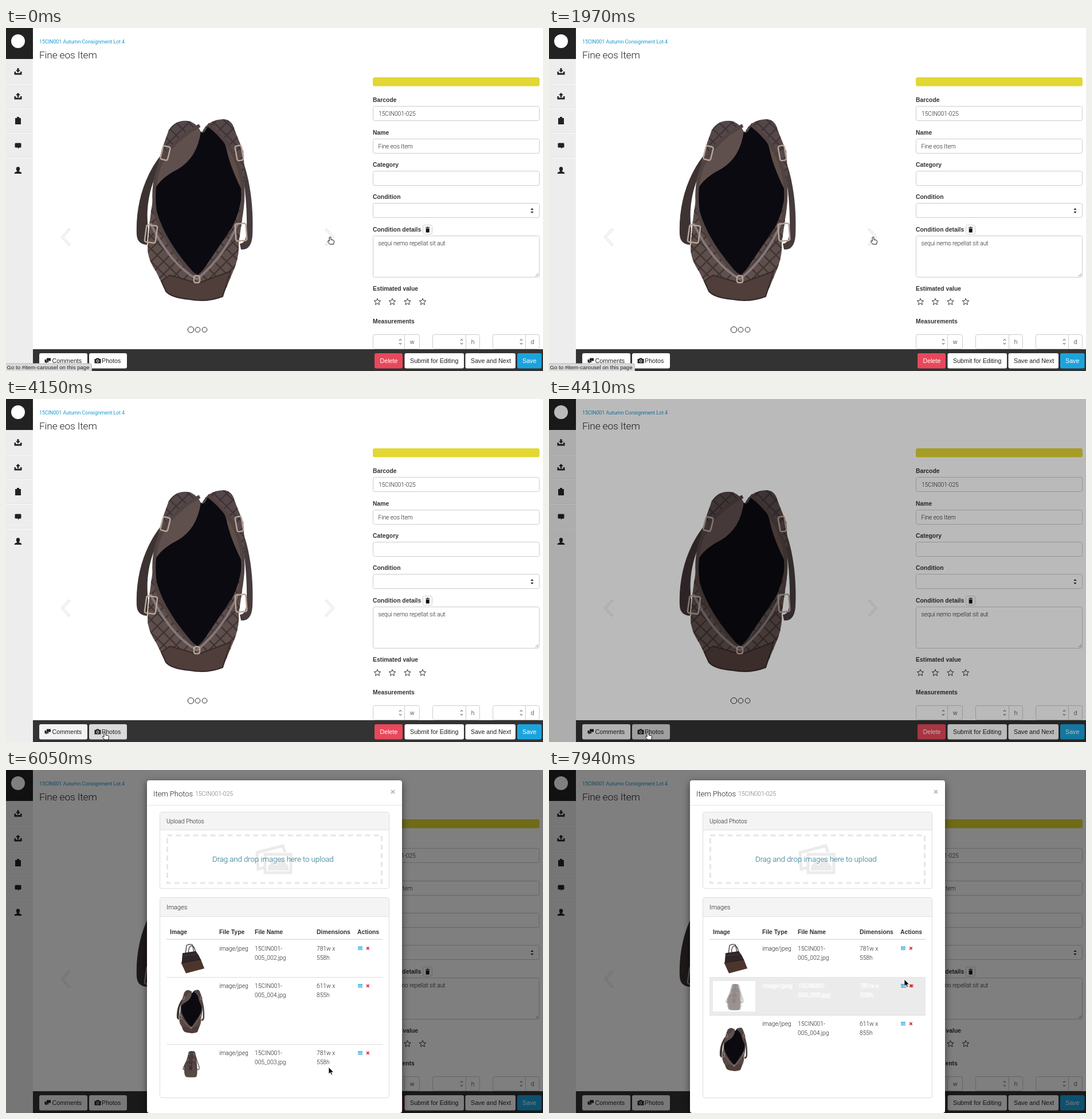
An HTML page for the animation above (8000 ms loop, 937 by 598 pixels).

```html
<!DOCTYPE html>
<html lang="en">
<head>
<meta charset="utf-8">
<title>Item photos</title>
<style>
html, body { margin: 0; width: 100%; height: 100%; overflow: hidden; background: #fff; }
svg { display: block; }
text { font: 300 10.4px Roboto, "Liberation Sans", sans-serif; letter-spacing: -.01em; fill: #222; }
.bold { font: bold 10.4px "Liberation Sans", sans-serif; letter-spacing: 0; fill: #333; }
.btn { font: 10.7px "Liberation Sans", sans-serif; letter-spacing: 0; }
.box { fill: #fff; stroke: #ccc; }
.ring { fill: none; stroke: #b9a597; stroke-width: 2.5; }
.rule { stroke: #ddd; }
.held text { fill: #fff; font-weight: 400; }
.held .thumb { opacity: .42; }
#sheet { filter: drop-shadow(0 4px 7px #0008); }
</style>
</head>
<body>
<svg id="stage" width="937" height="598" viewBox="0 0 937 598"></svg>
<script>
const LOOP = 8000;
const $ = id => document.getElementById(id);
const text = (x, y, s, attrs = '') => `<text x="${x}" y="${y}" ${attrs}>${s}</text>`;
const rect = (x, y, w, h, attrs = '') => `<rect x="${x}" y="${y}" width="${w}" height="${h}" ${attrs}/>`;
const path = (d, attrs = '') => `<path d="${d}" ${attrs}/>`;
const line = (d, color, width) => path(d, `fill="none" stroke="${color}" stroke-width="${width}"`);
const at = (x, y, s) => `<g transform="translate(${x} ${y})">${s}</g>`;
const ring = (x, y, w, h, turn) =>
  rect(-w / 2, -h / 2, w, h, `rx="3" class="ring" transform="translate(${x} ${y}) rotate(${turn})"`);
const cloth = d => path(d, 'fill="url(#hide)"') + path(d, 'fill="url(#weave)"');
const bold = (x, y, s) => text(x, y, s, 'class="bold"');
const field = (x, y, w, h) => rect(x + .5, y + .5, w - 1, h - 1, 'rx="3" class="box"');

// Bags, drawn at carousel size
const bagTop =
  path('M270 222C240 260 226 310 228 360Q229 377 246 378L248 350C243 310 252 270 270 242Z', 'fill="#3d3332"') +
  path('M412 228C428 270 432 320 430 362Q428 388 410 386L408 376Q420 376 420 350C421 310 416 260 408 240Z', 'fill="#463b3e"') +
  cloth('M284 178Q298 157 322 163Q337 170 341 184Q350 160 380 159Q395 160 399 178L414 215Q418 260 414 320L406 375Q408 400 394 430L378 468Q355 479 320 473Q285 470 278 458L262 425Q248 405 247 385Q250 330 258 290Q262 240 276 200Z') +
  path('M335 172Q300 190 272 238Q258 268 261 300L300 262L336 222L341 184Z', 'fill="#5f504e"') +
  path('M352 168Q382 180 387 205L404 240L414 288L392 250Z', 'fill="#5f4d48"') +
  path('M340 180Q345 188 353 170Q377 184 384 208Q390 240 412 284Q409 320 394 348L337 432Q318 424 286 378Q260 338 258 284Q268 262 300 246Q334 226 340 180Z', 'fill="#0b0a10"') +
  line('M338 170Q290 195 268 240Q254 275 260 320Q275 375 333 437Q385 385 405 345Q420 295 408 250Q395 200 352 168', '#504342', 6) +
  line('M252 340Q285 410 333 438Q380 400 405 340', '#85787a', 4) +
  path('M286 431L335 445L392 424L378 468Q350 479 320 473Q288 470 279 459L271 441Z', 'fill="#4f3e3a" stroke="#352a2a" stroke-width="2"') +
  ring(278, 218, 13, 24, 14) + ring(407, 218, 11, 26, -10) + ring(253, 359, 19, 30, 8) + ring(410, 356, 19, 30, -4) + ring(333, 438, 10, 12, 0);

const bagFront =
  line('M262 225L276 118Q330 96 350 116L368 215M300 210Q300 130 336 124Q374 124 386 200', '#3a302f', 9) +
  path('M226 215L390 190Q430 240 455 300L215 342Z', 'fill="#2f2627"') +
  line('M232 250L405 225', '#5b4f4e', 4) +
  path('M209 337L453 296L496 405L268 465Z', 'fill="#4c352d"') +
  line('M211 335L453 296', '#1f1818', 7);

const bagSide =
  line('M306 168C292 215 284 260 264 290Q236 335 236 351Q244 362 258 356M380 168C402 205 408 258 426 295Q440 332 434 354Q422 366 404 346', '#453938', 8) +
  cloth('M306 140Q312 129 342 128Q374 128 382 136L391 165Q401 210 405 265Q412 320 411 365Q410 410 403 440Q398 449 385 450Q330 453 275 447Q262 440 256 405L250 345Q252 290 264 272Q282 245 297 180Z') +
  path('M330 129L353 129Q369 200 372 264L300 268Q312 190 330 129Z', 'fill="#443837"') +
  line('M256 405Q247 320 264 282Q270 270 300 268L366 266Q384 270 394 300Q409 350 408 405Q406 436 396 444Q335 454 276 446Q262 438 256 405Z', '#332929', 3.5) +
  line('M343 130Q330 200 327 290M356 133Q366 190 366 262', '#786a69', 2.5) +
  path('M312 268L349 266L346 355Q328 384 310 354Z', 'fill="#3b302f"') +
  ring(313, 165, 20, 12, -30) + ring(372, 168, 20, 12, 30) + ring(299, 238, 22, 12, -35) + ring(364, 240, 22, 12, 40) + ring(326, 296, 10, 16, 0) +
  rect(321, 306, 11, 26, 'rx="2" fill="#4f4341" stroke="#2a2222"');

// Page parts
const star = x => {
  const pts = [...Array(10)].map((_, i) => {
    const a = i * Math.PI / 5, r = i % 2 ? 2.7 : 6;
    return [x + r * Math.sin(a), 477.5 - r * Math.cos(a)].map(v => v.toFixed(1));
  });
  return `<polygon points="${pts.join(' ')}" fill="none" stroke="#333"/>`;
};
const arrows = (x, y, attrs) => path(`M${x - 2.6} ${y - 1.5}l2.6-3 2.6 3zm0 3l2.6 3 2.6-3z`, attrs);
const spinner = (x, y) => line(`M${x - 2} ${y - 2}l2-2.5 2 2.5m-4 4l2 2.5 2-2.5`, '#444', 1);
const measure = (x, split, w, unit) =>
  field(x, 534, w, 26) + path(`M${x + split}.5 534v26`, 'stroke="#ccc"') + spinner(x + split - 7, 547) +
  text(x + (split + w) / 2, 550.5, unit, 'text-anchor="middle"');
const button = (x, w, label, tx, attrs, color = '#222') =>
  rect(x, 567, w, 26.5, `rx="3" ${attrs}`) + text(tx, 584, label, `class="btn" style="fill:${color}"`);
const chevron = path('M109.5 350L96.500 364.5L109.5 379L112 377.5L100 364.5L112 351.5Z', 'fill="none" stroke="#c8c8c8" stroke-width=".8"');
const tray = (y, arrow) => at(21, y, path('M-6.5 0V5.5H6.5V0H4V2.5H-4V0Z' + arrow, 'fill="#222"'));

const sidebar =
  rect(0, 0, 47, 598, 'fill="#ededed"') + rect(0, 0, 47, 54, 'fill="#222"') +
  '<circle cx="21" cy="23" r="12" fill="#fff"/>' +
  [97, 140, 183, 226].map(y => rect(0, y - 1, 47, 1, 'fill="#e0e0e0"') + rect(0, y, 47, 1, 'fill="#fff"')).join('') +
  tray(76, 'M-1.5-6H1.5V-2.5H4L0 1.5L-4-2.5H-1.5Z') + tray(119, 'M-1.5 1.5H1.5V-2H4L0-6L-4-2H-1.5Z') +
  path('M16 157h3v-2h4v2h3v11h-10z', 'fill="#222"') +
  path('M17 200.5h8q1.5 0 1.5 1.5v5q0 1.5-1.5 1.5h-2l-2 2v-2h-4q-1.5 0-1.5-1.5v-5q0-1.5 1.5-1.5z', 'fill="#222"') +
  path('M21 242c4 0 4 5 1.5 8q5 1 5 4h-13q0-3 5-4c-2.5-3-2.5-8 1.5-8z', 'fill="#222"');

const form =
  rect(640, 86, 291, 15.5, 'rx="3.5" fill="#e2d733"') +
  bold(640, 129, 'Barcode') + field(640, 136, 291, 26) + text(650, 153, '15CIN001-025') +
  bold(640, 185.5, 'Name') + field(640, 193, 291, 26) + text(649.5, 210, 'Fine eos Item') +
  bold(640, 242, 'Category') + field(640, 249, 291, 26) +
  bold(640, 298, 'Condition') + field(640, 305, 291, 26) + arrows(918, 318.5, 'fill="#222"') +
  bold(640, 354.5, 'Condition details') + field(727, 343, 17, 17) +
  path('M732 348.5h7.5v-1h-2.5v-1h-2.5v1h-2.5zm.7 1h6v7h-6z', 'fill="#111"') +
  field(640, 362, 291, 73) + text(649.5, 379, 'sequi nemo repellat sit aut') +
  path('M924 433l5-5m-2 5l2-2', 'stroke="#888"') +
  bold(640, 458, 'Estimated value') + [648, 674, 700.5, 727].map(star).join('') +
  bold(640, 515, 'Measurements') +
  measure(640, 55, 82, 'w') + measure(744, 58, 83, 'h') + measure(849, 57, 82, 'd');

const footer =
  rect(47, 560, 890, 38, 'fill="#333"') +
  button(58, 84, 'Comments', 80.5, 'id="comments"') + button(145, 66, 'Photos', 167, 'id="photos"') +
  path('M71 575.5h7v5h-4.5l-2 2v-2h-.5zM67.5 578h3v3.5h4v1.5h-3l-2 2v-2h-2z', 'fill="#222"') +
  path('M154.5 577h2.5l1-1.5h4l1 1.5h2.5v7.5h-11z', 'fill="#222"') +
  '<circle cx="160" cy="580.5" r="2" fill="#222" stroke="#fff"/>' +
  button(643, 49, 'Delete', 652.5, 'fill="#e8485b"', '#fff') + button(695.5, 103.5, 'Submit for Editing', 705, 'fill="#fff"') +
  button(801.5, 87.5, 'Save and Next', 811, 'fill="#fff"') + button(892, 42.5, 'Save', 901, 'fill="#1ca3dd"', '#fff');

// Modal parts
const thumbs = {
  top: 'translate(322 21.5) scale(.238) translate(-329 -158)',
  front: 'translate(323 7.5) scale(.141) translate(-332 -104)',
  side: 'translate(323 11.5) scale(.141) translate(-336 -128)'
};
const rowBody = (bag, number, w, h) =>
  `<g class="thumb"><use href="#${bag}" transform="${thumbs[bag]}"/></g>` +
  text(372, 18.5, 'image/jpeg') + text(434, 18.5, '15CIN001-') + text(434, 34.5, `005_${number}.jpg`) +
  text(542, 18.5, w + 'w x') + text(542, 34.5, h + 'h') +
  line('M614 12.5h8m-8 2.3h8m-8 2.3h8', '#1ca3dd', 1.3) +
  line('M629.2 12.5l4.4 4.6m0-4.6l-4.4 4.6', '#d8232f', 1.6);
const sideBody = rowBody('side', '003', 781, 558);
const rule = y => path(`M280 ${y}H657`, 'class="rule"');
const panel = (y, h, head, label, size) =>
  rect(268.5, y + .5, 400, h, 'rx="3" fill="#fff" stroke="#ddd"') +
  rect(269, y + 1, 399, head, 'rx="2" fill="#f4f4f4"') + path(`M269 ${y + head + .5}H668`, 'class="rule"') +
  text(280, y + head / 2 + 4.5, label, `style="font-size:${size}px"`);

const modal =
  rect(246, 18, 445, 580, 'id="sheet" rx="4" fill="#fff"') +
  text(257, 46, 'Item Photos', 'style="font-size:13.2px"') +
  text(330, 45, '15CIN001-025', 'style="font-size:10.6px;fill:#777"') +
  line('M672 35l6 6m0-6l-6 6', '#aaa', 1.6) + line('M246 61.5H691', '#e5e5e5', 1) +
  panel(73, 133, 31, 'Upload Photos', 10.4) +
  rect(281.5, 114, 374, 83, 'fill="none" stroke="#e6e6e6" stroke-width="3" stroke-dasharray="9 6"') +
  line('M452 147H497V179H452ZM450 170L440 173L438 144L483 132L487 143', '#ebebeb', 5) +
  path('M457 175V168L465 159L471 166L481 153L493 168V175Z', 'fill="#ebebeb"') +
  text(360, 160, 'Drag and drop images here to upload', 'style="font-size:13.4px;fill:#1f7089"') +
  panel(222, 349, 33, 'Images', 11.3) +
  bold(286, 285.5, 'Image') + bold(372, 285.5, 'File Type') + bold(434, 285.5, 'File Name') +
  bold(542, 285.5, 'Dimensions') + bold(613, 285.5, 'Actions') +
  rect(280, 294.5, 377, 1.5, 'fill="#ddd"') +
  at(0, 296, rowBody('front', '002', 781, 558)) +
  `<g id="rowTop">${rule(0)}${rowBody('top', '004', 611, 855)}</g>` +
  `<g id="rowSide">${rule(0)}<g id="shade">` + rect(280, 0, 377, 65.5, 'fill="#ebebeb"') +
  rect(286, 6.5, 74, 53, 'fill="#fff"') + `</g>${sideBody}</g>` +
  `<g id="ghost" class="held" opacity=".7">${sideBody}</g>`;

$('stage').innerHTML =
  '<defs><linearGradient id="hide" x2="0" y2="1"><stop stop-color="#54474a"/><stop offset="1" stop-color="#62514b"/></linearGradient>' +
  '<pattern id="weave" width="22" height="22" patternUnits="userSpaceOnUse">' +
  line('M0 0L22 22M22 0L0 22', '#3f3434', 2.5) + '</pattern>' +
  `<g id="top">${bagTop}</g><g id="front">${bagFront}</g><g id="side">${bagSide}</g></defs>` +
  rect(0, 0, 937, 598, 'fill="#fff"') + sidebar +
  text(58, 27, '15CIN001 Autumn Consignment Lot 4', 'style="font-size:9px;font-weight:400;fill:#1b9ad2"') +
  text(58, 52.5, 'Fine eos Item', 'style="font-size:17.4px"') +
  '<use id="slide"/>' + chevron + `<g transform="matrix(-1 0 0 1 669 0)">${chevron}</g>` +
  [0, 1, 2].map(i => `<circle id="dot${i}" cx="${322.5 + 12 * i}" cy="526" fill="#fff" stroke="#222"/>`).join('') +
  form + footer + rect(0, 0, 937, 598, 'id="dim"') + `<g id="modal">${modal}</g>` +
  '<g id="status">' + rect(-4, 585, 0, 20, 'id="statusBox" rx="3" fill="#dadada" stroke="#bbb"') +
  text(1.5, 595, '', 'id="statusText" style="font:9.6px Liberation Sans,sans-serif;letter-spacing:0"') + '</g>' +
  '<g id="cursor">' +
  path('M0 0V12L2.8 9.5L4.7 13.6L6.6 12.8L4.8 8.9H8.5Z', 'id="arrow" stroke="#fff" stroke-width=".8"') +
  path('M-1.4 1Q0-.8 1.4 1V5L5.5 5.8Q7.4 6.5 7 8.5L6 13H-.5L-4 8.5Q-4 6.5-2.5 7L-1.4 8Z', 'id="hand" fill="#fff" stroke="#111"') + '</g>';

// Cursor: first step, last step, number of steps, x, y, shape
const moves = [
  [0, 0, 1, 565.5, 364, 'hand'], [2240, 2240, 1, 535, 373, 'arrow'], [2390, 3090, 7, 206, 557, 'arrow'],
  [3210, 3210, 1, 199, 561, 'arrow'], [3450, 3560, 2, 178, 576, 'hand'], [3800, 4150, 4, 172.5, 581, 'hand'],
  [4590, 4590, 1, 172.5, 582, 'arrow'], [5570, 6050, 5, 563, 518, 'arrow'], [6170, 6170, 1, 577, 514, 'arrow'],
  [6410, 6410, 1, 588, 507, 'arrow'], [6560, 6910, 4, 614, 490.5, 'arrow'], [7380, 7380, 1, 618, 415, 'arrow'],
  [7560, 7560, 1, 618, 409.5, 'arrow'], [7770, 7770, 1, 619, 369.5, 'arrow'], [7940, 7940, 1, 620, 365, 'arrow']
];
function cursorAt(t) {
  let x = 0, y = 0, shape;
  for (const [from, to, n, tx, ty, kind] of moves) {
    if (t < from) break;
    const k = n > 1 ? Math.min(n, 1 + Math.floor((t - from) / (to - from) * (n - 1) + 1e-6)) / n : 1;
    x += (tx - x) * k;
    y += (ty - y) * k;
    shape = kind;
  }
  return { x, y, shape };
}

// Value of the last [time, value] pair already reached
const pick = (t, pairs) => pairs.filter(p => p[0] <= t).pop()[1];
const set = (id, name, value) => $(id).setAttribute(name, value);
const show = (id, on) => set(id, 'display', on ? 'inline' : 'none');
const place = (id, x, y) => set(id, 'transform', `translate(${x} ${y})`);

function draw(t) {
  const slide = pick(t, [[0, 0], [150, 1], [1100, 2], [1970, 0]]);
  set('slide', 'href', '#' + ['top', 'front', 'side'][slide]);
  for (let i = 0; i < 3; i++) set('dot' + i, 'r', i === slide ? 5.2 : 4.3);

  set('comments', 'fill', pick(t, [[0, '#fff'], [2740, '#f3f3f3']]));
  set('photos', 'fill', pick(t, [[0, '#fff'], [2740, '#f0f0f0'], [3450, '#dadada'], [4590, '#f3f3f3']]));
  set('dim', 'opacity', pick(t, [[0, 0], [4410, .27], [4590, .5]]));
  set('modal', 'opacity', pick(t, [[0, 0], [4590, .32], [4890, 1]]));
  place('modal', 0, t < 4890 ? -107 : 0);

  const c = cursorAt(t), dragging = t >= 7380, swapped = t >= 7940;
  place('cursor', c.x, c.y);
  show('arrow', c.shape === 'arrow');
  show('hand', c.shape === 'hand');

  place('rowTop', 0, swapped ? 427.5 : 361.5);
  place('rowSide', 0, swapped ? 361.5 : 478.5);
  set('rowSide', 'class', dragging ? 'held' : '');
  show('shade', dragging);
  show('ghost', dragging);
  place('ghost', c.x - 618, c.y - 3.5);

  const note = pick(t, [[0, '#item-carousel'], [2623, ''], [6910, '#'], [7200, ''], [7770, '#'], [7940, '']]);
  show('status', note);
  set('statusBox', 'width', note.length > 1 ? 153.5 : 95.5);
  $('statusText').textContent = `Go to ${note} on this page`;
}

const start = performance.now();
function tick() {
  draw((performance.now() - start) % LOOP);
  requestAnimationFrame(tick);
}
tick();
</script>
</body>
</html>
```
